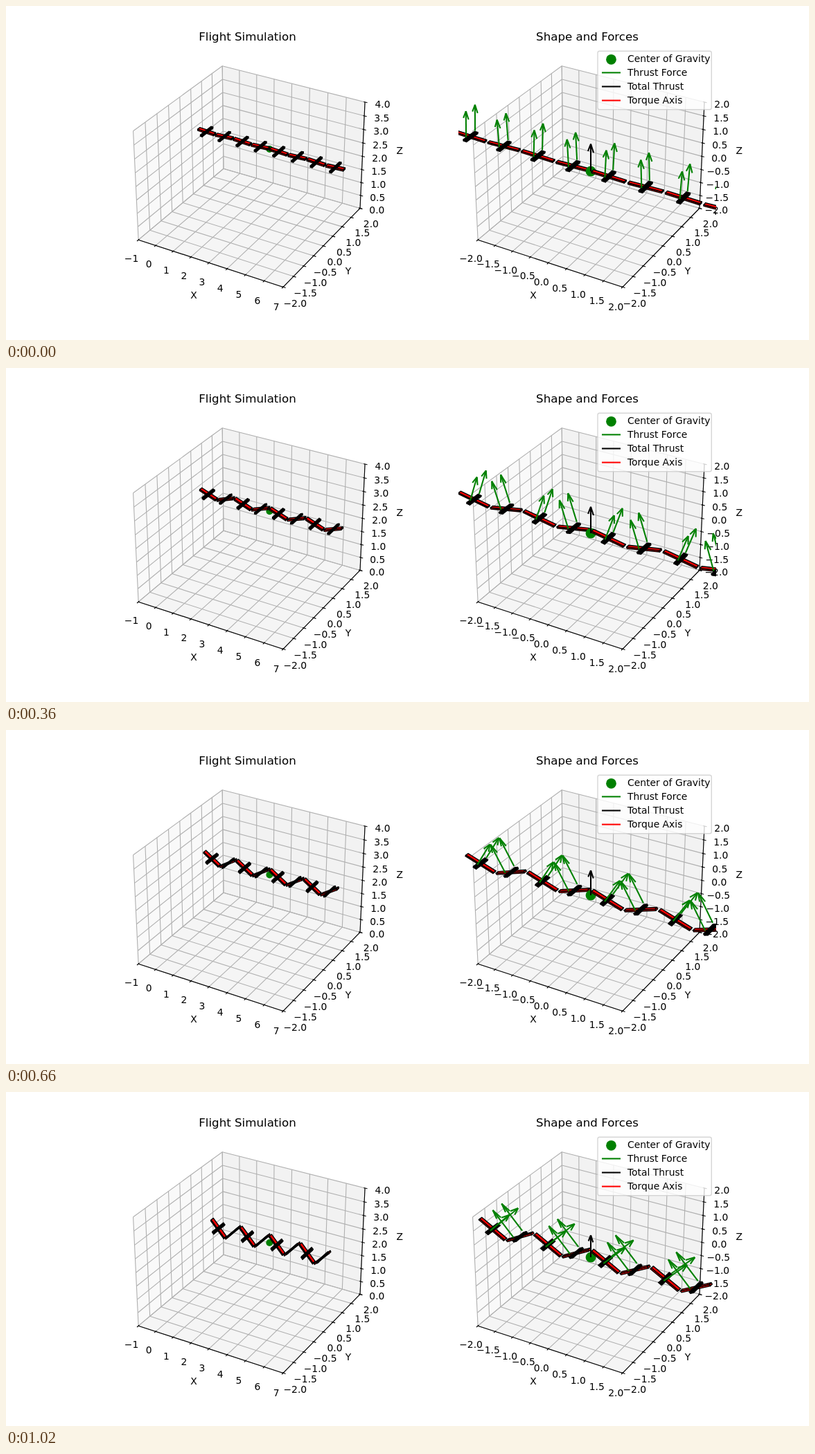
Write an HTML page that moves like this. It is 1159 by 483 pixels and loops after 1.08 s.

```html
<!DOCTYPE html>
<html lang="en">
<head>
<meta charset="utf-8">
<title>Flight Simulation</title>
<style>
  html, body { margin: 0; width: 100%; height: 100%; overflow: hidden; background: #fff; }
  svg { display: block; width: 1159px; height: 483px; }
  text { font-family: "DejaVu Sans", sans-serif; font-size: 13.89px; }
  .mid { text-anchor: middle; }
  .title { font-size: 16.67px; }
  .grid { fill: none; stroke: #b0b0b0; stroke-width: 1.11; stroke-linejoin: round; }
  .axis { fill: none; stroke: #000; stroke-width: 1.11; }
  .line { fill: none; stroke-width: 2.08; }
  .box { stroke: #000; stroke-width: 1.39; stroke-linejoin: round; }
</style>
</head>
<body>
<svg viewBox="0 0 1159 483">
  <defs><clipPath id="clip"><rect x="653" y="58" width="372" height="372"/></clipPath></defs>
  <g id="axes"></g>
  <g id="flight"></g>
  <g id="forces" clip-path="url(#clip)"></g>
  <g id="legend"></g>
</svg>
<script>
const STEP = 60, STEPS = 18;
const SCALE = 2010.3, ORIGIN_Y = 238.9, DIST = 10;
const BOX = [1.190476, 1.190476, 0.892857];
const GREEN = '#008000', RED = '#f00', BLACK = '#000';
const RAD = Math.PI / 180;
const $ = id => document.getElementById(id);

// Perspective camera at elevation 30, azimuth -60, looking at the box centre.
function project(ox, [x, y, z]) {
  const c = Math.sqrt(3) / 2;
  const depth = DIST - (c / 2 * x - 0.75 * y + 0.5 * z);
  const right = c * x + 0.5 * y;
  const up = -0.25 * x + c / 2 * y + c * z;
  return [ox + SCALE * right / depth, ORIGIN_Y - SCALE * up / depth];
}

function makePanel(ox, centre, span, ticks) {
  return {
    ox, ticks,
    world: p => p.map((v, i) => (v - centre[i]) / span[i] * BOX[i]),
    at(p) { return project(ox, this.world(p)); }
  };
}

const range = (from, step) => Array.from({ length: 9 }, (_, i) => from + i * step);
const halves = range(-2, 0.5);
const left = makePanel(354.05, [3, 0, 2], [8, 4, 4], [range(-1, 1), halves, range(0, 0.5)]);
const right = makePanel(844.02, [0, 0, 0], [4, 4, 4], [halves, halves, halves]);

const pts = list => list.map(p => p.map(v => v.toFixed(2)).join()).join(' ');
const polyline = (list, cls, extra = '') => `<polyline class="${cls}" points="${pts(list)}" ${extra}/>`;
const polygon = (list, fill, cls = '') => `<polygon class="${cls}" points="${pts(list)}" fill="${fill}"/>`;
const dot = ([x, y], r) => `<circle cx="${x.toFixed(2)}" cy="${y.toFixed(2)}" r="${r}" fill="${GREEN}"/>`;
const label = (x, y, str, cls = 'mid') => `<text class="${cls}" x="${x.toFixed(1)}" y="${y.toFixed(1)}">${str}</text>`;

function drawAxes(panel, title, titleX) {
  const [X, Y, Z] = BOX.map(v => v / 2);
  const proj = list => list.map(p => project(panel.ox, p));
  let s = polygon(proj([[-X, -Y, -Z], [-X, Y, -Z], [-X, Y, Z], [-X, -Y, Z]]), '#f9f9f9')
        + polygon(proj([[-X, Y, -Z], [X, Y, -Z], [X, Y, Z], [-X, Y, Z]]), '#f2f2f2')
        + polygon(proj([[-X, -Y, -Z], [X, -Y, -Z], [X, Y, -Z], [-X, Y, -Z]]), '#f5f5f5');

  // Each axis: grid path, anchor on its edge, outward direction, tick direction.
  const axes = [
    { name: 'X', grid: v => [[v, -Y, -Z], [v, Y, -Z], [v, Y, Z]],
      edge: v => [v, -Y, -Z], out: [0, -1, -0.75], tick: [0, -1, 0] },
    { name: 'Y', grid: v => [[X, v, -Z], [-X, v, -Z], [-X, v, Z]],
      edge: v => [X, v, -Z], out: [1, 0, -0.75], tick: [1, 0, 0] },
    { name: 'Z', grid: v => [[-X, -Y, v], [-X, Y, v], [X, Y, v]],
      edge: v => [X, Y, v], out: [1, 1, 0], tick: [1, 0, 0] }
  ];
  const shift = (p, dir, k) => p.map((v, i) => v + dir[i] * k);
  const places = i => range(-BOX[i] / 2, BOX[i] / 8);

  axes.forEach((a, i) => places(i).forEach(v => s += polyline(proj(a.grid(v)), 'grid')));
  axes.forEach((a, i) => {
    const half = BOX[i] / 2, ticks = panel.ticks[i];
    const whole = ticks[1] - ticks[0] === 1;
    s += polyline(proj([a.edge(-half), a.edge(half)]), 'axis');
    places(i).forEach((v, n) => {
      const e = a.edge(v);
      s += polyline(proj([shift(e, a.tick, -0.0095), shift(e, a.tick, 0.019)]), 'axis');
      const [x, y] = project(panel.ox, shift(e, a.out, 0.0942));
      s += label(x, Math.round(y + 11), ticks[n].toFixed(whole ? 0 : 1).replace('-', '\u2212'));
    });
    const [x, y] = project(panel.ox, shift(a.edge(0), a.out, 0.2049));
    s += label(x, Math.round(y + 4.2), a.name);
  });
  return s + label(titleX, 50, title, 'mid title');
}

function drawLegend() {
  const rows = ['Center of Gravity', 'Thrust Force', 'Total Thrust', 'Torque Axis'];
  const colors = [null, GREEN, BLACK, RED];
  let s = '<rect x="854" y="65.2" width="164.3" height="84.5" rx="2.8" fill="#fff" fill-opacity=".8"'
        + ' stroke="#ccc" stroke-opacity=".8" stroke-width="1.39"/>' + dot([873.5, 77.3], 7.4);
  rows.forEach((row, i) => {
    const y = 76.3 + i * 20.1;
    if (i) s += polyline([[860, y], [887, y]], 'line', `stroke="${colors[i]}"`);
    s += label(897, Math.round(y + 4.7), row, '');
  });
  return s;
}

// The three camera-facing sides of a box given by its half sizes.
function drawBox(place, [l, w, h], fill) {
  const sides = [
    [[l, -w, -h], [l, w, -h], [l, w, h], [l, -w, h]],
    [[-l, -w, -h], [l, -w, -h], [l, -w, h], [-l, -w, h]],
    [[-l, -w, h], [l, -w, h], [l, w, h], [-l, w, h]]
  ];
  return sides.map(side => polygon(side.map(place), fill, 'box')).join('');
}

// Arrow in the x-z plane, angle measured from vertical.
function drawArrow(panel, [x, y, z], angle, length, color) {
  const move = (p, a, d) => [p[0] + Math.sin(a) * d, y, p[2] + Math.cos(a) * d];
  const tip = move([x, y, z], angle, length);
  const barb = turn => panel.at(move(tip, angle + turn * RAD, -0.3 * length));
  const top = panel.at(tip), stroke = `stroke="${color}"`;
  return polyline([panel.at([x, y, z]), top], 'line', stroke)
       + polyline([barb(15), top], 'line', stroke)
       + polyline([barb(-15), top], 'line', stroke);
}

function drawModule(panel, base, i, angle, withForces) {
  const tilt = i % 2 ? -angle : angle;
  const cos = Math.cos(tilt), sin = Math.sin(tilt);
  const local = ([l, w, h]) => [
    base[0] + (i - 3.5) * cos + l * cos + h * sin,
    base[1] + w,
    base[2] - l * sin + h * cos
  ];
  const place = p => panel.at(local(p));
  let s = drawBox(place, [0.45, 0.05, 0.025], RED) + drawBox(place, [0.05, 0.25, 0.025], BLACK);
  if (withForces) {
    for (const w of [0.2, -0.2]) s += drawArrow(panel, local([0, w, 0.1]), tilt, 1, GREEN);
  }
  return s;
}

function render(step) {
  const n = step + 1, angle = 2 * n * RAD;
  const drop = 2.57e-5 * n * (n + 1) ** 2 * (n + 2) / 12;
  const body = [4, 0, 3 - drop], zero = [0, 0, 0];
  let flight = dot(left.at(body), 5), forces = '';
  for (let i = 0; i < 8; i++) {
    flight += drawModule(left, body, i, angle, false);
    if (i === 4) {
      forces += dot(right.at(zero), 7.4) + drawArrow(right, zero, 0, Math.cos(angle), BLACK);
    }
    forces += drawModule(right, zero, i, angle, true);
  }
  $('flight').innerHTML = flight;
  $('forces').innerHTML = forces;
}

$('axes').innerHTML = drawAxes(left, 'Flight Simulation', 348.5) + drawAxes(right, 'Shape and Forces', 839);
$('legend').innerHTML = drawLegend();

let shown = -1;
function tick(now) {
  const step = Math.floor(now / STEP) % STEPS;
  if (step !== shown) render(shown = step);
  requestAnimationFrame(tick);
}
render(0);
requestAnimationFrame(tick);
</script>
</body>
</html>
```
